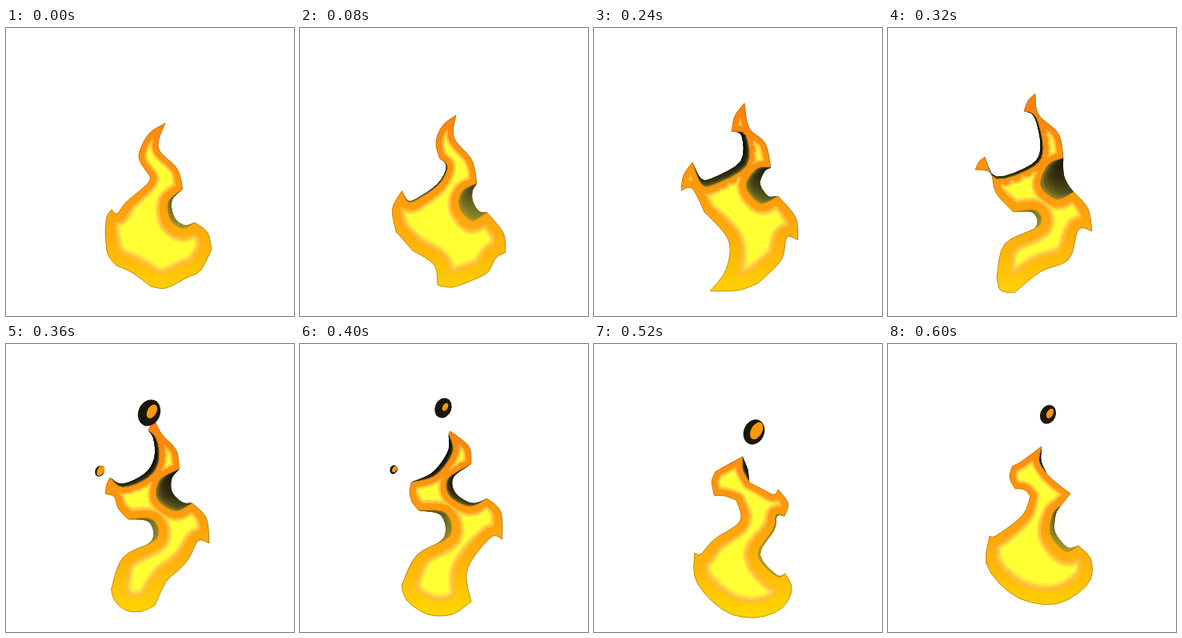
Recreate the animation shown at these times as an HTML page with a canvas. Size 360x360 px, loop 0.64 s.

```html
<!DOCTYPE html>
<html lang="en">
<head>
<meta charset="utf-8">
<title>Flame</title>
<style>
  html, body { margin: 0; width: 100%; height: 100%; overflow: hidden; background: #fff; }
  canvas { display: block; }
</style>
</head>
<body>
<canvas id="stage" width="360" height="360"></canvas>
<script>
const LOOP = 640, STEP = 40, SAMPLES = 20;
const ctx = document.getElementById('stage').getContext('2d');

// Ten smooth runs per outline, split by "/" at the corners, counter-clockwise from the tip.
// A lone number opening a run is how far its hollow is filled with soot.
const poses = [
  { at: 0, outline: `199,119 178,133 166,160 / 176,180 179,192 150,218 139,232 / 132,227 126,236
    / 124,255 127,282 / 138,297 158,306 / 181,323 200,325 / 226,312 243,303 / 257,277 252,256
    / .2 236,243 221,250 206,240 203,217 / 221,201 214,176 193,155 191,140` },
  { at: 160, outline: `191,99 176,116 / .15 173,146 188,156 184,185 152,202 132,202 / 123,180 109,204 106,222
    / 117,257 122,237 / 143,259 177,286 / 163,320 180,323 / 200,321 230,305 240,282 / 257,284 256,256
    / 1 231,218 208,231 193,207 203,191 / 221,187 216,152 194,126` },
  { at: 240, outline: `188,94 176,110 / .2 172,129 190,134 191,172 150,196 134,195 / 123,168 112,184
    / 109,203 123,201 / 138,230 168,265 165,302 / 145,329 180,328 / 205,319 234,290 241,262 / 255,265 252,237
    / .5 230,210 208,219 190,198 203,176 / 221,174 214,144 194,125` },
  { at: 320, outline: `184,82 175,91 / .08 170,104 185,111 194,150 183,173 136,189 / 121,161 114,167
    / 109,177 128,181 135,206 / .12 157,230 185,228 189,247 146,270 / 136,312 141,328
    / 158,331 190,305 226,289 238,252 / 255,254 250,226
    / .85 232,205 211,214 191,197 200,171 / 219,162 213,132 188,108` },
  { at: 400, outline: `188,109 / .3 186,112 191,135 170,164 / 139,173 137,186 / 140,198
    / .15 148,208 182,211 187,240 147,263 / 127,302 134,321 160,338 190,338 / 214,322 209,282 238,242
    / 253,244 251,210 / .2 234,193 212,203 187,190 185,168 / 214,150 211,128` },
  { at: 480, outline: `183,147 160,157 / 150,163 145,173 / 145,182 / 146,194 160,194
    / 178,198 188,228 150,252 135,273 / 125,272 131,308 170,346 220,348 243,325
    / 239,304 230,306 203,272 235,234 238,216 / 249,222 253,202 / 231,179 229,193 212,187
    / 2 192,178 184,161` },
  { at: 600, outline: `192,128 168,146 / 155,153 152,165 / 154,173 / 159,181 170,182
    / 178,190 168,214 136,239 / 127,240 124,278 160,316 210,325 250,300 254,270
    / .25 238,252 222,259 203,238 206,212 / 216,202 / 228,187 211,174 / .4 199,163 189,147` }
];

// Torn-off pieces rise at a steady rate, shrink and cool.
const embers = [
  { from: 360, to: 440, x: 179, y: 86, rise: .15, size: 15, heat: .55 },
  { from: 360, to: 440, x: 117, y: 159, rise: .05, size: 5, heat: 1 },
  { from: 440, to: 640, x: 200, y: 132, rise: .275, size: 18, heat: .9 }
];

const mix = (a, b, k) => a + (b - a) * k;
const mixPoint = (p, q, k) => [mix(p[0], q[0], k), mix(p[1], q[1], k)];
const mixLine = (a, b, k) => a.map((p, i) => mixPoint(p, b[i], k));

function spline(p0, p1, p2, p3, t) {
  return [0, 1].map(i => p1[i] + t / 2 * (p2[i] - p0[i]
    + t * (2 * p0[i] - 5 * p1[i] + 4 * p2[i] - p3[i]
    + t * (3 * (p1[i] - p2[i]) + p3[i] - p0[i]))));
}

function smooth(pts) {
  const last = pts.length - 1;
  const pick = n => pts[Math.max(0, Math.min(last, n))];
  return Array.from({ length: SAMPLES + 1 }, (_, s) => {
    const u = s / SAMPLES * last, n = Math.floor(u);
    return spline(pick(n - 1), pick(n), pick(n + 1), pick(n + 2), u - n);
  });
}

function parse(outline) {
  const runs = outline.split('/').map(run => {
    const words = run.trim().split(/\s+/);
    const soot = words[0].includes(',') ? 0 : Number(words.shift());
    return { soot, keys: words.map(w => w.split(',').map(Number)) };
  });
  return runs.map(({ soot, keys }, i) => ({
    soot, line: smooth([...keys, runs[(i + 1) % runs.length].keys[0]])
  }));
}

poses.forEach(p => p.runs = parse(p.outline));

function ramp(y0, y1, ...colors) {
  const g = ctx.createLinearGradient(0, y0, 0, y1);
  colors.forEach((c, i) => g.addColorStop(i / (colors.length - 1), c));
  return g;
}

const fire = ramp(90, 335, '#ff7f0e', '#ff8f0c', '#ff9c0b', '#ffb40a', '#ffd400');
const sootTone = ramp(150, 260, '#0c0b08', '#2a2710', '#6e6b20', '#a89c30');
const glow = [[1, '#ffec3a'], [.9, '#ffd040'], [.8, '#ffbc38'], [.65, fire]];

function trace(pts) {
  const path = new Path2D();
  pts.forEach(([x, y]) => path.lineTo(x, y));
  path.closePath();
  return path;
}

// Soot fills a hollow from its edge towards the chord, darker with each layer.
function drawSoot({ line, soot }) {
  if (!soot) return;
  const chord = line.map((_, i) => mixPoint(line[0], line[SAMPLES], i / SAMPLES));
  const outer = mixLine(line, chord, soot);
  const layer = depth => trace([...outer, ...mixLine(line, outer, depth).reverse()]);
  ctx.fillStyle = '#b5a436';
  ctx.fill(layer(0));
  ctx.globalAlpha = .45;
  ctx.fillStyle = sootTone;
  for (let depth = 0; depth < .8; depth += .15) ctx.fill(layer(depth));
  ctx.globalAlpha = 1;
}

// The yellow core is what remains beyond a rim that widens downwards.
function drawBody(pts) {
  const body = trace(pts);
  ctx.save();
  ctx.clip(body);
  ctx.fillStyle = '#ffff33';
  ctx.fill(body);
  for (const [part, color] of glow) {
    ctx.beginPath();
    for (const [x, y] of pts) {
      const r = part * (11 + .11 * Math.max(0, y - 180));
      ctx.moveTo(x + r, y);
      ctx.arc(x, y, r, 0, 7);
    }
    ctx.fillStyle = color;
    ctx.fill();
  }
  ctx.restore();
  ctx.lineWidth = .9;
  ctx.strokeStyle = '#80600099';
  ctx.stroke(body);
}

function ellipse(x, y, rx, ry, tilt, color) {
  ctx.beginPath();
  ctx.ellipse(x, y, rx, ry, tilt, 0, 7);
  ctx.fillStyle = color;
  ctx.fill();
}

function drawEmber({ from, to, x, y, rise, size, heat }, time) {
  if (time < from || time >= to) return;
  const age = time - from, r = size * (1 - .55 * age / (to - from)) + 2;
  const hot = heat * (1 - .5 * age / (to - from));
  const cy = y - rise * age;
  ellipse(x, cy, r * .8, r, .4, '#1a170a');
  ellipse(x + r * .2, cy - r * .1, r * hot * .6, r * hot, .5, '#ff980c');
}

function draw(time) {
  const i = poses.findLastIndex(p => p.at <= time);
  const a = poses[i], b = poses[(i + 1) % poses.length];
  const k = (time - a.at) / ((b.at || LOOP) - a.at);
  const runs = a.runs.map((run, n) => ({
    soot: mix(run.soot, b.runs[n].soot, k),
    line: mixLine(run.line, b.runs[n].line, k)
  }));

  ctx.clearRect(0, 0, 360, 360);
  runs.forEach(drawSoot);
  drawBody(runs.flatMap(run => run.line));
  embers.forEach(e => drawEmber(e, time));
}

function tick() {
  draw(Math.floor(performance.now() % LOOP / STEP) * STEP);
  requestAnimationFrame(tick);
}
tick();
</script>
</body>
</html>
```
